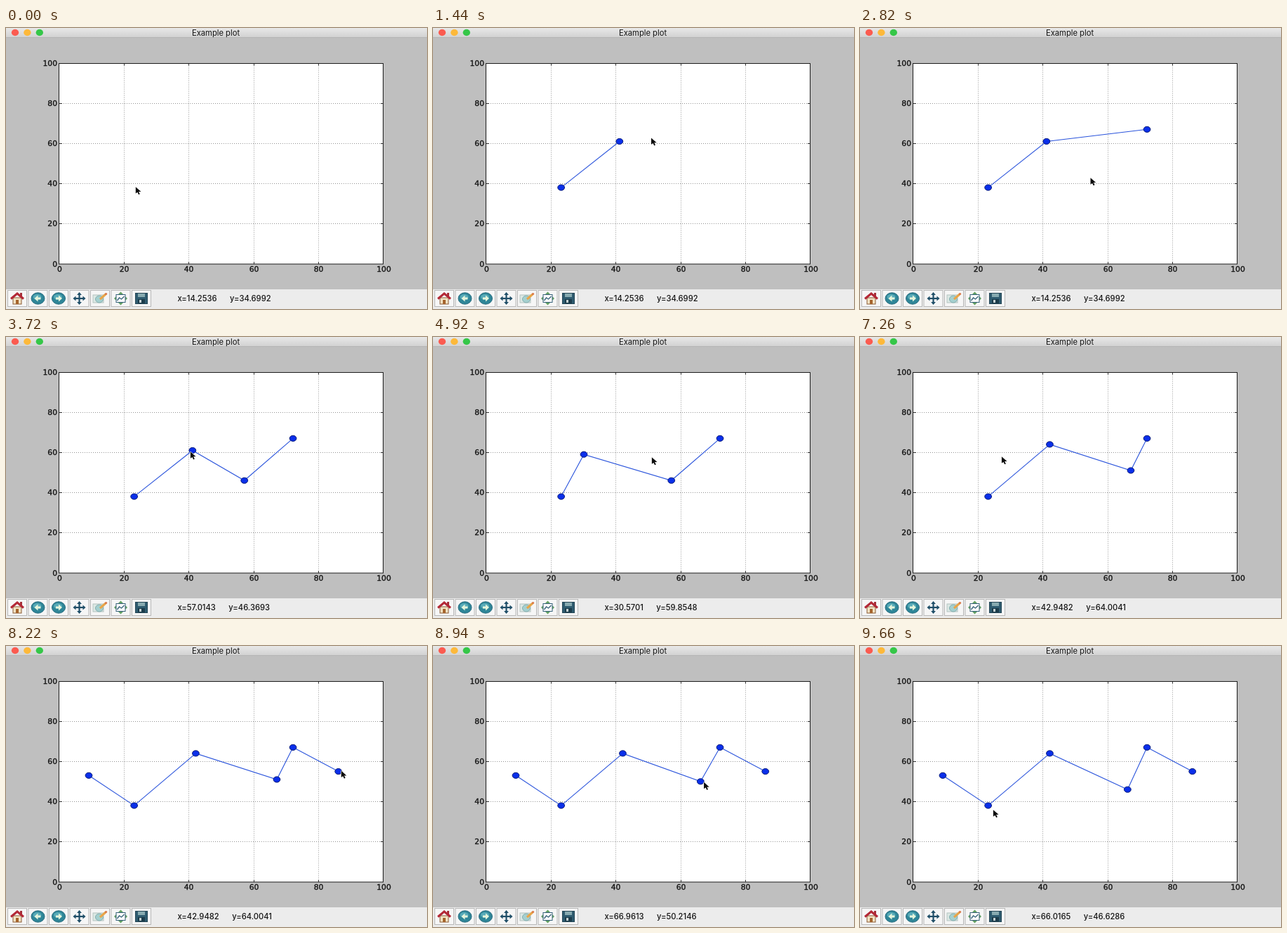
Recreate the animation shown at these times as an HTML page with a canvas. Size 600 by 400 pixels, loop 9720 ms.

```html
<!DOCTYPE html>
<html lang="en">
<head>
<meta charset="utf-8">
<title>Example plot</title>
<style>
html, body { margin: 0; width: 100%; height: 100%; overflow: hidden; background: #bfbfbf; }
canvas { display: block; width: 600px; height: 400px; }
</style>
</head>
<body>
<canvas id="stage" width="600" height="400"></canvas>
<script>
const ctx = document.getElementById('stage').getContext('2d');
const LOOP = 9720, STEP = 60, HOLD = 120, GRAB_RADIUS = 3;
const AXES = { left: 76, top: 50.5, right: 538, bottom: 336 };
const UI_FONT = '500 11.2px Inter, sans-serif';
const TICK_FONT = '10.8px "DejaVu Sans", sans-serif';

// Gestures in data units. A press near a point grabs it, elsewhere it adds one.
const distance = (a, b) => Math.hypot(a[0] - b[0], a[1] - b[1]);
const gesture = (kind, at, from, to = from) =>
  ({ kind, at, from, to, end: at + (kind === 'drag' ? 180 + 35 * distance(from, to) : 0) });
const click = (at, x, y) => gesture('click', at, [x, y]);
const erase = (at, x, y) => gesture('erase', at, [x, y]);
const rest = (at, x, y) => gesture('rest', at, [x, y]);
const drag = (at, from, to) => gesture('drag', at, from, to);

const gestures = [
  click(240, 23.4, 38.9), click(1080, 41.4, 61.5), click(1920, 72.4, 67.6),
  drag(2880, [54.5, 43.4], [57.0143, 46.3693]),
  drag(3780, [40.3, 60.9], [30.5701, 59.8548]),
  rest(4920, 50.9, 58.1),
  drag(5520, [41.5, 63.2], [42.9482, 64.0041]),
  click(6000, 67.3, 51.5), rest(6300, 67.3, 42.4),
  erase(6660, 57.4, 46.5), erase(7080, 30.4, 59.4),
  click(7500, 9.3, 53.5), click(8100, 86.8, 55.9),
  drag(8820, [67.3, 51.5], [66.0165, 46.6286]),
  rest(9660, 24.5, 36.4)
];

const toX = v => AXES.left + v / 100 * (AXES.right - AXES.left);
const toY = v => AXES.bottom - v / 100 * (AXES.bottom - AXES.top);

function glide(from, to, t0, t1, t) {
  const u = t1 > t0 ? Math.min(1, Math.max(0, (t - t0) / (t1 - t0))) : 1;
  return from.map((v, i) => v + (to[i] - v) * u * u * (3 - 2 * u));
}

function pointerAt(t) {
  const next = gestures.findIndex(g => g.at > t);
  if (next === 0) return gestures[0].from;
  const current = gestures.at(next < 0 ? -1 : next - 1);
  if (t < current.end || next < 0) return glide(current.from, current.to, current.at, current.end, t);
  const target = gestures[next], hold = current.kind === 'rest' ? 0 : HOLD;
  const arrive = target.at - (target.kind === 'rest' ? 0 : 60);
  return glide(current.to, target.from, current.end + hold, arrive, t);
}

function plotAt(t) {
  let points = [], readout = [14.2536, 34.6992];
  for (const g of gestures.filter(g => g.at <= t && g.kind !== 'rest')) {
    const near = points.find(p => distance(p, g.from) < GRAB_RADIUS);
    points = points.filter(p => p !== near);
    if (g.kind === 'erase') continue;
    const spot = glide(g.from, g.to, g.at, g.end, t);
    if (g.kind === 'drag') readout = spot;
    points.push(spot.map(Math.floor));
  }
  return { points: points.sort((a, b) => a[0] - b[0]), readout };
}

function rect(x, y, w, h, fill, stroke) {
  if (fill) { ctx.fillStyle = fill; ctx.fillRect(x, y, w, h); }
  if (stroke) { ctx.strokeStyle = stroke; ctx.lineWidth = 1; ctx.strokeRect(x, y, w, h); }
}

function oval(x, y, rx, ry, fill, stroke) {
  ctx.beginPath();
  ctx.ellipse(x, y, rx, ry, 0, 0, Math.PI * 2);
  ctx.fillStyle = fill;
  ctx.fill();
  if (stroke) { ctx.strokeStyle = stroke; ctx.lineWidth = 1; ctx.stroke(); }
}

function line(coords, color, width = 1) {
  ctx.beginPath();
  coords.forEach(([x, y]) => ctx.lineTo(x, y));
  ctx.strokeStyle = color;
  ctx.lineWidth = width;
  ctx.stroke();
}

function shape(coords, fill) {
  ctx.beginPath();
  coords.forEach(([x, y]) => ctx.lineTo(x, y));
  ctx.closePath();
  ctx.fillStyle = fill;
  ctx.fill();
}

function text(str, x, y, font, align = 'left', weight = 0) {
  ctx.font = font;
  ctx.textAlign = align;
  ctx.fillStyle = ctx.strokeStyle = '#141414';
  ctx.fillText(str, x, y);
  if (weight) { ctx.lineWidth = weight; ctx.strokeText(str, x, y); }
}

function fourWays(draw) {
  for (let i = 0; i < 4; i++) {
    draw();
    ctx.rotate(Math.PI / 2);
  }
}

function drawWindow() {
  rect(0, 0, 600, 400, '#bfbfbf');
  const fade = ctx.createLinearGradient(0, 0, 0, 13);
  fade.addColorStop(0, '#e8e8e8');
  fade.addColorStop(1, '#d2d2d2');
  rect(0, 0, 600, 13, fade);
  rect(0, 13, 600, 1, '#b4b4b4');
  ['#fb5b50', '#fdb93a', '#35c748'].forEach((c, i) => oval(13 + i * 17.4, 6.5, 5.2, 4.7, c));
  text('Example plot', 299, 10.5, UI_FONT.replace('500', '400'), 'center');
  rect(0, 372, 600, 28, '#ececec');
}

function drawAxes() {
  const { left, top, right, bottom } = AXES;
  rect(left, top, right - left, bottom - top, '#fff');
  for (let v = 0; v <= 100; v += 20) {
    const x = Math.floor(toX(v)) + 0.5, y = Math.floor(toY(v)) + 0.5;
    if (v % 100) {
      ctx.setLineDash([1, 2]);
      line([[x, top], [x, bottom]], '#929292');
      line([[left, y], [right, y]], '#929292');
      ctx.setLineDash([]);
      for (const [edge, d] of [[top, 3], [bottom, -3]]) line([[x, edge], [x, edge + d]], '#333');
      for (const [edge, d] of [[left, 4], [right, -4]]) line([[edge, y], [edge + d, y]], '#333');
    }
    text(v, x, 347, TICK_FONT, 'center', 0.35);
    text(v, 73, y + 3.5, TICK_FONT, 'right', 0.35);
  }
  rect(left - 0.5, top, right - left, bottom - top, null, '#1c1c1c');
}

function drawHome() {
  rect(-6, -1, 12, 9, '#f2e3c4', '#8a5a35');
  rect(-2, 2, 4, 6, '#a5642c');
  rect(4, -8, 3, 5, '#a3313a');
  line([[-9, 0.5], [0, -7], [9, 0.5]], '#b32836', 3);
}

function drawBall(dir) {
  oval(0, 0, 9.5, 8.2, '#2f8698', '#276c80');
  oval(-1, -2, 6, 4, '#58abb8');
  line([[-4 * dir, 0], [2 * dir, 0]], '#e6f5dc', 3);
  shape([[5 * dir, 0], [0, -4.5], [0, 4.5]], '#e6f5dc');
}

function drawPan() {
  fourWays(() => {
    line([[0, 0], [6, 0]], '#1f4e68', 2.2);
    shape([[9, 0], [5, -3.4], [5, 3.4]], '#1f4e68');
  });
}

function drawZoom() {
  rect(-10, -5, 15, 11, '#dce8e4', '#b3c3c0');
  oval(-1, 1, 5.5, 5, '#a5d0cf', '#83aeb0');
  line([[0, 1], [8, -6]], '#e8a548', 3);
  oval(8.5, -6.5, 1.7, 1.5, '#d97848');
}

function drawSubplots() {
  fourWays(() => shape([[9.5, 0], [5.5, -4], [5.5, 4]], '#62a062'));
  rect(-6.5, -5.5, 13, 11, '#fafafa', '#35617a');
  line([[-5, 3], [-2, -1], [1, 1], [5, -3]], '#35617a', 1.3);
}

function drawSave() {
  rect(-8.5, -7.5, 17, 15, '#2f5c70', '#244656');
  rect(-5, -7, 10, 5, '#87aab0');
  rect(-5, 1, 10, 6, '#1c3c4b');
  rect(-3, 2, 3, 4, '#c4d0d2');
}

const icons = [drawHome, () => drawBall(-1), () => drawBall(1), drawPan, drawZoom, drawSubplots, drawSave];

function drawToolbar(readout) {
  icons.forEach((icon, i) => {
    const x = 2.5 + i * 29.5;
    rect(x, 373.5, 27, 23, '#f6f6f6', '#b8b8b8');
    ctx.save();
    ctx.translate(x + 13.5, 385);
    icon();
    ctx.restore();
  });
  const [x, y] = readout.map(v => v.toFixed(4));
  const label = 'x=' + x;
  text(label, 244.5, 389, UI_FONT);
  text('y=' + y, 244.5 + ctx.measureText(label).width + 18.5, 389, UI_FONT);
}

function drawSeries(points) {
  const spots = points.map(([x, y]) => [toX(x) + 0.4, toY(y) - 0.4]);
  if (spots.length > 1) line(spots, '#2c55dc', 1.1);
  spots.forEach(([x, y]) => oval(x, y, 4.9, 4.1, '#0a2fea', '#0a1c78'));
}

function drawPointer([x, y]) {
  const arrow = [[0, 0], [0, 11], [3, 9], [5, 13], [7, 12], [5, 8], [9, 8]];
  ctx.save();
  ctx.translate(toX(x) + 0.7, toY(y) + 1.2);
  ctx.scale(0.85, 0.85);
  ctx.lineJoin = 'round';
  line([...arrow, arrow[0]], '#fff', 1.4);
  shape(arrow, '#0c0c0c');
  ctx.restore();
}

function render(now) {
  const t = Math.floor((now % LOOP) / STEP) * STEP;
  const { points, readout } = plotAt(t);
  drawWindow();
  drawAxes();
  drawSeries(points);
  drawToolbar(readout);
  drawPointer(pointerAt(t));
}

const start = performance.now();
function tick() {
  render(performance.now() - start);
  requestAnimationFrame(tick);
}
tick();
</script>
</body>
</html>
```
